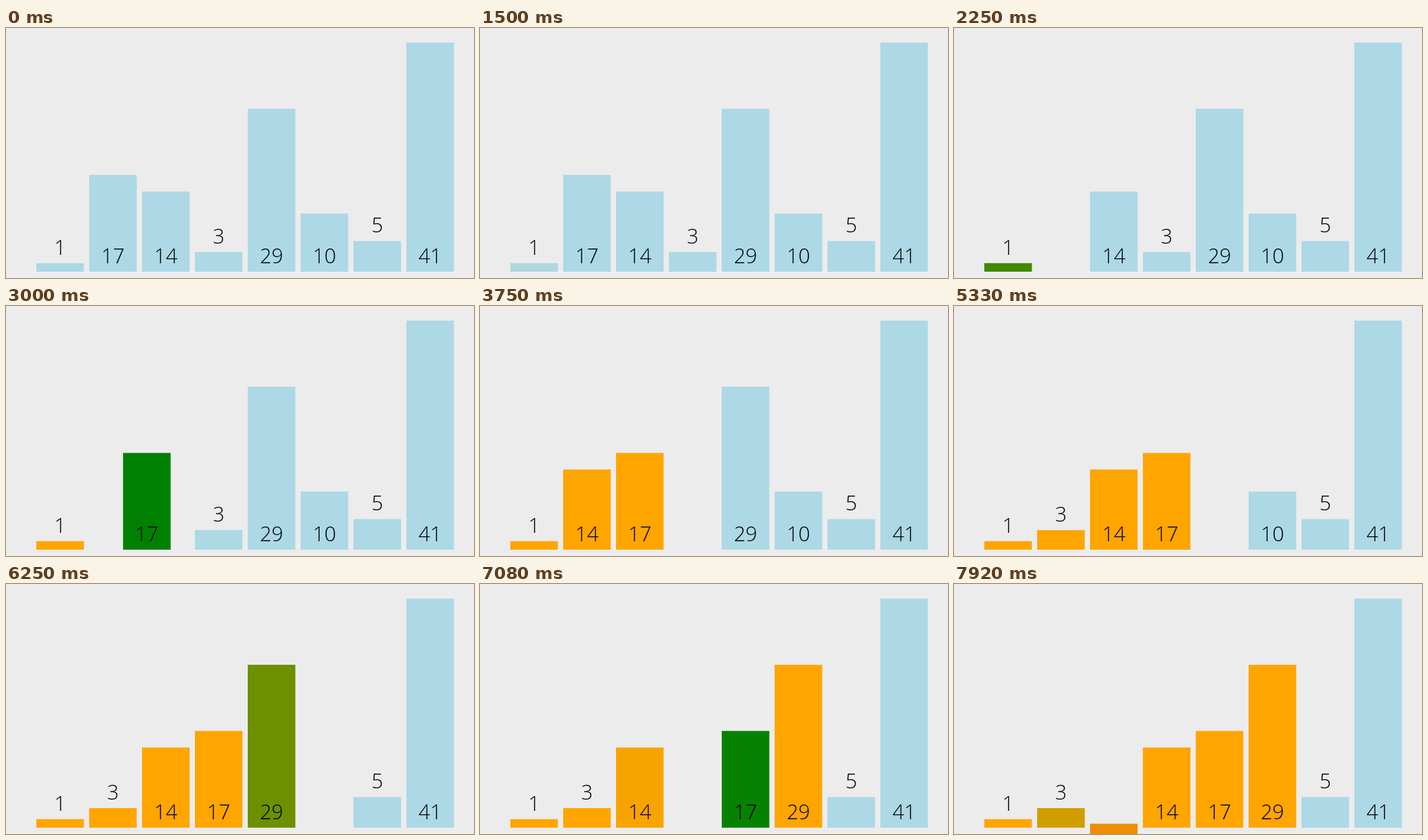
An HTML page for the animation above (8 s loop, 664 by 356 pixels).

```html
<!DOCTYPE html>
<html lang="en">
<head>
<meta charset="utf-8">
<title>Insertion sort</title>
<style>
  html, body { margin: 0; width: 100%; height: 100%; overflow: hidden; background: #ececec; }
  svg { display: block; }
  text { font: 300 29px "Open Sans", "Noto Sans", sans-serif; text-anchor: middle; }
</style>
</head>
<body>
<svg id="stage" width="664" height="356"></svg>
<script>
const VALUES = [1, 17, 14, 3, 29, 10, 5, 41];
const BLUE = [173, 216, 230], ORANGE = [255, 165, 0], GREEN = [0, 128, 0], KEY = [165, 42, 42];
const LOOP = 8000, START = 1469, STEP = 232.8, FPS = 12;
const LEFT = 43, PITCH = 75, WIDTH = 67.5, BASE = 347, DROP = 418;
const stage = document.getElementById("stage");

function add(parent, tag, attrs) {
  const el = document.createElementNS("http://www.w3.org/2000/svg", tag);
  for (const k in attrs) el.setAttribute(k, attrs[k]);
  return parent.appendChild(el);
}

const bars = VALUES.map((value, slot) => {
  const height = 7.85 * value + 4.3;
  const g = add(stage, "g", {});
  const rect = add(g, "rect", { y: BASE - height, width: WIDTH, height });
  const label = add(g, "text", { x: WIDTH / 2, y: BASE - 12 - (height < 50 ? height : 0) });
  label.textContent = value;
  return { value, slot, g, rect };
});

// Each step is a list of changes that run together: bar, property, end value.
function sortSteps() {
  const row = [...bars];
  const steps = [[[row[0], "color", ORANGE]]];
  for (let i = 1; i < row.length; i++) {
    const key = row[i];
    let j = i - 1, fade = [];
    steps.push([[key, "y", DROP], [key, "color", KEY]]);
    for (; j >= 0; j--) {
      const other = row[j];
      steps.push([...fade, [other, "color", GREEN]]);
      fade = [[other, "color", ORANGE]];
      if (other.value <= key.value) break;
      steps.push([[other, "x", j + 1]]);
      row[j + 1] = other;
    }
    row[j + 1] = key;
    // The key travels sideways while it is out of sight.
    steps.push([...fade, [key, "y", 0], [key, "color", ORANGE], [key, "x", j + 1, true]]);
  }
  return steps;
}

const steps = sortSteps();
const ease = p => p < 0.5 ? 2 * p * p : 1 - 2 * (1 - p) ** 2;
const mix = (a, b, p) => Array.isArray(a) ? a.map((v, i) => mix(v, b[i], p)) : a + (b - a) * p;

function draw(time) {
  const pos = (time - START) / STEP;
  for (const b of bars) Object.assign(b, { x: b.slot, y: 0, color: BLUE });
  for (let i = 0; i < steps.length && i < pos; i++) {
    const p = ease(Math.min(1, pos - i));
    for (const [bar, prop, to, jump] of steps[i]) bar[prop] = mix(bar[prop], to, jump ? 1 : p);
  }
  for (const b of bars) {
    b.g.setAttribute("transform", `translate(${LEFT + PITCH * b.x} ${b.y})`);
    b.rect.setAttribute("fill", `rgb(${b.color.map(Math.round)})`);
  }
}

const origin = performance.now();
function tick() {
  const time = (performance.now() - origin) % LOOP;
  draw(Math.floor((time + 5) * FPS / 1000) * 1000 / FPS);
  requestAnimationFrame(tick);
}
tick();
</script>
</body>
</html>
```
